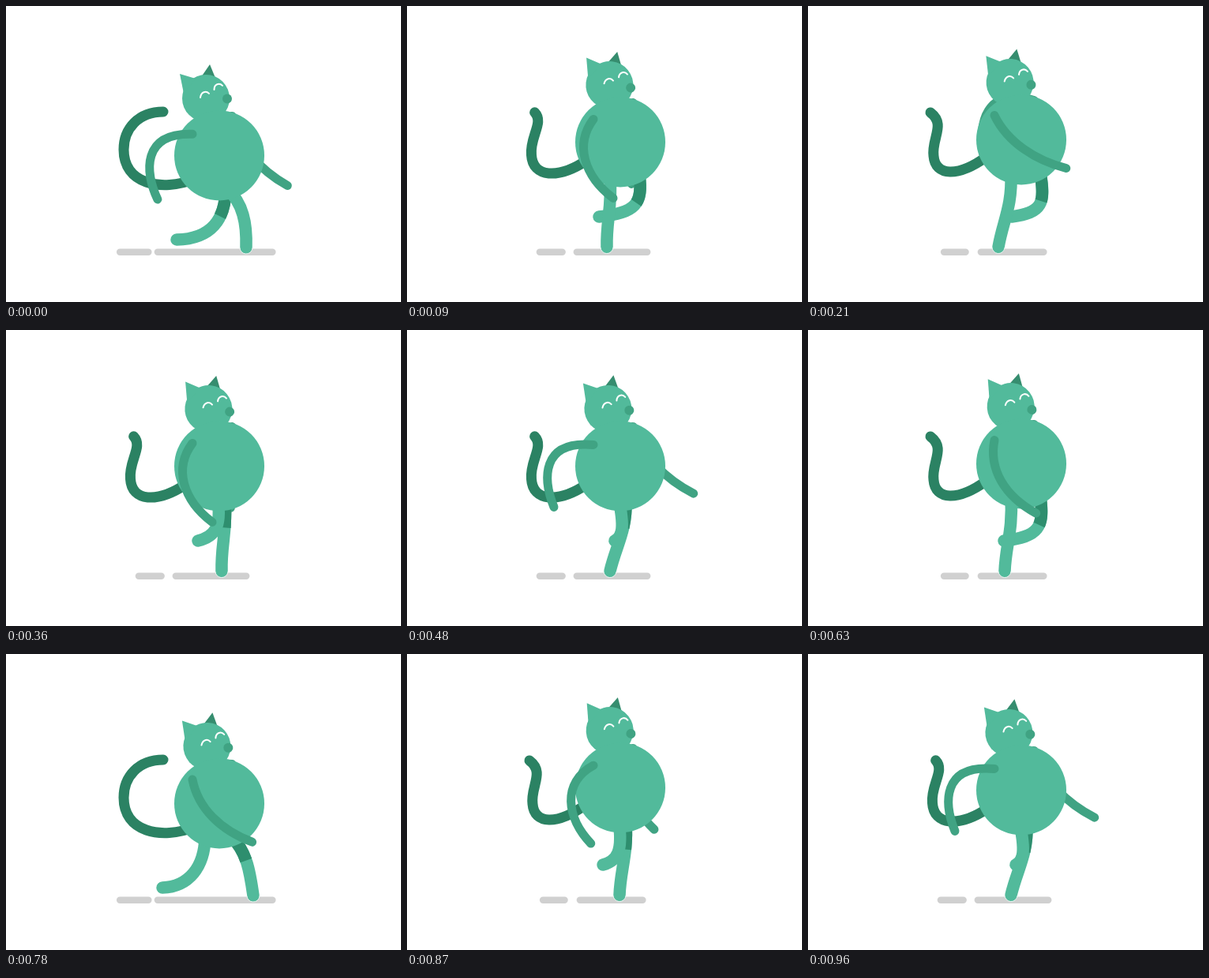
These frames come from a looping animation (500 px wide and 375 px high, 0.99 s). An HTML page with a canvas:

```html
<!DOCTYPE html>
<html lang="en">
<head>
<meta charset="utf-8">
<title>Walking cat</title>
<style>
html, body { margin: 0; width: 100%; height: 100%; overflow: hidden; background: #fff; }
canvas { display: block; }
</style>
</head>
<body>
<canvas id="stage" width="500" height="375"></canvas>
<script>
const ctx = document.getElementById('stage').getContext('2d');
const STEP = 30, FRAMES = 33, CYCLE = 16, HOLD = 4;
const LIGHT = '#52ba9b', MID = '#40a383', DARK = '#2b8263', THIGH = '#2e8e6e', EAR = '#368d6f', GROUND = '#d0d0d0';

// Arm at the two ends and the middle of its swing, relative to the shoulder.
const ARM = {
  back: [-67, -6, -64, 44, -50, 79],
  down: [-24, 32, -12, 72, 25, 100],
  forth: [20, 33, 58, 54, 96, 62]
};
// Leg poses: x and y of knee bends and foot, foot drift per step,
// and how far the far leg's hip and foot stand ahead of the near one's.
const LEG = {
  front: { hip: 280, path: [300, 250, 305, 275, 304, 306], drift: -3, ahead: [5, 12] },
  stance: { hip: 257, path: [260, 255, 252, 272, 253, 305.5], drift: -4, ahead: [20, 20] },
  back: { hip: 252, path: [252, 270, 234, 295, 204, 296], drift: -6, ahead: [26, 12] },
  swing: { hip: 268, path: [273, 250, 264, 262, 243, 267], drift: 5, ahead: [26, 0] }
};
// Tail at the top and bottom of the bob.
const TAIL = {
  high: [155, 135, 175, 150, 156, 168, 159, 190, 161, 216, 190, 217, 226, 191],
  low: [199, 134, 168, 134, 149, 155, 149, 182, 149, 225, 195, 236, 240, 219]
};

const mix = (a, b, k) => a.map((v, i) => v + (b[i] - v) * k);
const rad = deg => deg * Math.PI / 180;

function disc(x, y, r, color) {
  ctx.fillStyle = color;
  ctx.beginPath();
  ctx.arc(x, y, r, 0, 2 * Math.PI);
  ctx.fill();
}

// Points: start, then groups of three for each bezier.
function curve(pts, width, color, cap = 'round') {
  ctx.lineWidth = width;
  ctx.strokeStyle = color;
  ctx.lineCap = cap;
  ctx.beginPath();
  ctx.moveTo(pts[0], pts[1]);
  for (let i = 2; i < pts.length; i += 6) ctx.bezierCurveTo(...pts.slice(i, i + 6));
  ctx.stroke();
}

function triangle(color, x1, y1, x2, y2, x3, y3) {
  ctx.fillStyle = color;
  ctx.beginPath();
  ctx.moveTo(x1, y1);
  ctx.lineTo(x2, y2);
  ctx.lineTo(x3, y3);
  ctx.fill();
}

function bar(x1, x2) {
  ctx.fillStyle = GROUND;
  ctx.beginPath();
  ctx.roundRect(x1, 307.5, x2 - x1, 8.5, 4.2);
  ctx.fill();
}

// s runs from -1 (back) to 1 (forth) on a parabola through the three poses.
function arm(s, x, y, tilt) {
  const pts = ARM.down.map((m, i) => {
    const a = ARM.back[i], b = ARM.forth[i];
    return m + s * (b - a) / 2 + s * s * (a + b - 2 * m) / 2;
  });
  ctx.save();
  ctx.translate(x, y);
  ctx.rotate(rad(tilt));
  curve([0, 0, ...pts], 11, MID);
  ctx.restore();
}

// Contact poses last three steps, passing poses five.
function leg(q, y, far) {
  const h = q % 8, contact = h >= 1 && h <= 3;
  const lead = q >= 1 && q <= 8;
  const name = contact ? (lead ? 'front' : 'back') : (lead ? 'stance' : 'swing');
  const { hip, path, drift, ahead } = LEG[name];
  const k = contact ? h - 1 : (h + 4) % 8;
  const pts = [hip, y, ...path].map((v, i) => {
    if (i % 2) return v;
    const t = i / 6;
    return v + drift * k * t * t + (far ? ahead[t < 1 ? 0 : 1] : 0);
  });
  curve(pts, 15.5, LIGHT);
  if (far) {
    ctx.setLineDash([36, 400]);
    curve(pts, 15.5, THIGH, 'butt');
    ctx.setLineDash([]);
  }
  if (lead) {
    ctx.lineWidth = 1;
    ctx.strokeStyle = '#e4f3ee';
    ctx.beginPath();
    ctx.arc(pts[6], pts[7], 8.1, 0.1, Math.PI - 0.1);
    ctx.stroke();
  }
}

function head(p, y) {
  ctx.save();
  ctx.translate(253, y - 42.5);
  ctx.rotate(rad(7 * Math.abs(Math.sin(Math.PI * (p - 1) / 8))));
  ctx.translate(0, -30);
  triangle(EAR, 5, -43, -6, -27, 12, -26);
  disc(0, 0, 30, LIGHT);
  triangle(LIGHT, -33, -31, -28, -6, -13, -25);
  curve([-7, -1, -6, -8, 0, -10, 4, -6], 2, '#fff');
  curve([10.5, -11, 10.5, -18, 17, -20, 21, -16], 2, '#fff');
  disc(27, 0.5, 6, MID);
  ctx.restore();
}

function draw(p) {
  const d = Math.abs(p % 8 - 6), near = Math.min(d, 8 - d);
  const sink = near > 2 ? 21 : near * near;
  const y = 168.4 + sink;
  const swing = -Math.cos(2 * Math.PI * p / CYCLE);

  ctx.fillStyle = '#fff';
  ctx.fillRect(0, 0, 500, 375);
  bar(169.3 - 1.4 * sink, 204.7 - 0.96 * sink);
  bar(216 - 1.35 * sink, 300.6 + 1.95 * sink);
  curve(mix(TAIL.high, TAIL.low, (sink - 1) / 20), 13, DARK);
  arm(-swing, 286, y - 50, 15);
  leg((p + 8) % CYCLE, y + 42, true);
  leg(p, y + 42, false);
  head(p, y);
  disc(270, y, 57, LIGHT);
  arm(swing, 236, y - 29 - 2 * swing, 0);
}

function tick() {
  const n = Math.floor(performance.now() / STEP) % FRAMES;
  draw((n < HOLD ? n + 1 : n) % CYCLE);
  requestAnimationFrame(tick);
}
tick();
</script>
</body>
</html>
```
